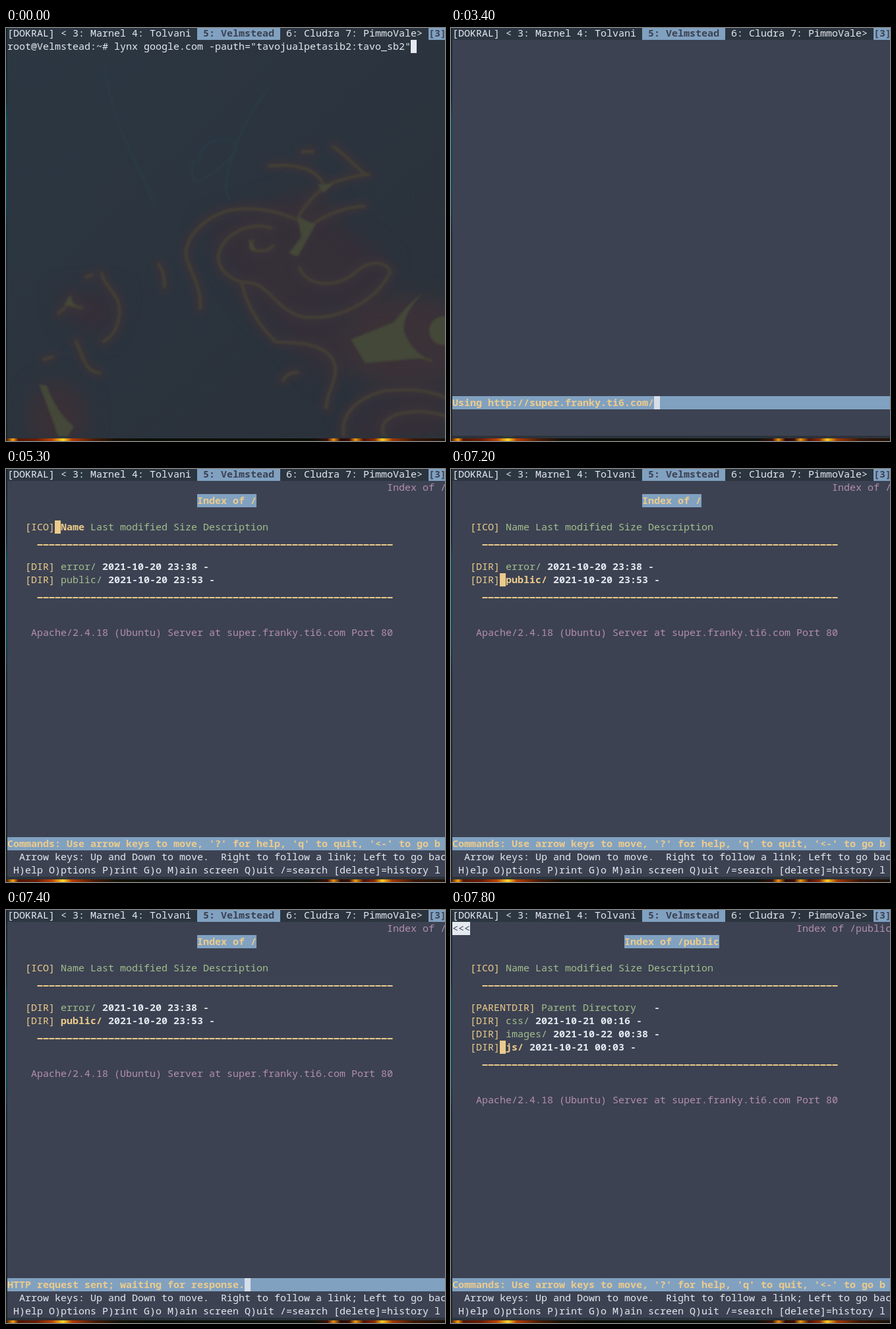
Write an HTML page that moves like this. It is 666x626 px and loops after 8 s.

```html
<!DOCTYPE html>
<html lang="en">
<head>
<meta charset="utf-8">
<title>Terminal session</title>
<style>
  html, body { margin: 0; width: 100%; height: 100%; overflow: hidden; background: #2b343e; }
  svg { display: block; width: 100%; height: 100%; }
  text { font: 15px "Noto Sans Mono", "DejaVu Sans Mono", monospace; font-variant-ligatures: none; white-space: pre; }
  .b { font-weight: 700; }
  filter { color-interpolation-filters: sRGB; }
  #veins { fill: none; stroke-linecap: round; }
</style>
</head>
<body>
<svg viewBox="0 0 666 626">
  <defs>
    <filter id="soft" x="-10%" y="-10%" width="120%" height="120%"><feGaussianBlur stdDeviation="1.6"/></filter>
    <filter id="glow" x="-10%" y="-10%" width="120%" height="120%"><feGaussianBlur stdDeviation="5"/></filter>
    <filter id="wide" x="-20%" y="-20%" width="140%" height="140%"><feGaussianBlur stdDeviation="16"/></filter>
    <linearGradient id="base" x2="1" y2="1">
      <stop stop-color="#2c3742"/><stop offset=".5" stop-color="#2b343e"/><stop offset="1" stop-color="#2a3039"/>
    </linearGradient>
    <linearGradient id="edge" x2="0" y2="1">
      <stop stop-color="#15262d"/><stop offset=".17" stop-color="#12303a"/><stop offset=".22" stop-color="#0d4859"/>
      <stop offset=".42" stop-color="#0f4353"/><stop offset=".5" stop-color="#142d35"/><stop offset="1" stop-color="#1d2522"/>
    </linearGradient>
    <linearGradient id="fire">
      <stop stop-color="#3a1200"/><stop offset=".016" stop-color="#ffa010"/><stop offset=".028" stop-color="#541600"/>
      <stop offset=".07" stop-color="#6a1c00"/><stop offset=".105" stop-color="#c04400"/><stop offset=".13" stop-color="#ffdc28"/>
      <stop offset=".15" stop-color="#b83c00"/><stop offset=".2" stop-color="#4a1a02"/>
      <stop offset=".25" stop-color="#161004"/><stop offset=".32" stop-color="#0a0e06"/><stop offset=".7" stop-color="#0d1008"/>
      <stop offset=".732" stop-color="#3a1000"/><stop offset=".746" stop-color="#f09010"/><stop offset=".762" stop-color="#2a0a00"/>
      <stop offset=".782" stop-color="#3a0e00"/><stop offset=".796" stop-color="#f09a10"/><stop offset=".815" stop-color="#4a1200"/>
      <stop offset=".84" stop-color="#902c00"/><stop offset=".857" stop-color="#ffd020"/>
      <stop offset=".88" stop-color="#a03800"/><stop offset=".93" stop-color="#3a1604"/><stop offset="1" stop-color="#1c1006"/>
    </linearGradient>
    <g id="veins">
      <path d="M400 209C440 206 472 212 483 240Q515 225 550 222M497 180C515 192 530 210 543 220M483 240Q458 262 444 285"/>
      <path d="M543 270C515 272 488 280 462 300L437 343"/>
      <path d="M455 298C420 278 380 270 340 276C296 288 268 322 274 350C281 372 296 392 295 425"/>
      <path d="M402 303C370 294 330 310 322 345C322 370 345 386 370 386C402 391 410 428 450 438C505 444 560 415 583 370C575 350 548 354 530 370C510 390 462 398 445 364"/>
      <path d="M358 388C365 420 386 455 410 476C450 476 495 480 500 516C500 540 485 556 486 576"/>
      <path d="M374 322Q370 338 385 338T405 330M420 534Q430 520 443 522M450 188L465 187"/>
      <path d="M145 372C150 395 175 402 172 435Q168 465 148 475M106 475C118 498 118 520 142 523M80 432Q95 422 98 408M98 420L115 424M232 358Q242 374 240 392M122 377L130 375M58 502L70 499"/>
      <path d="M513 620C505 590 530 560 575 550Q630 544 666 560M575 620Q562 598 592 586Q630 576 666 588"/>
      <path d="M600 462Q608 495 645 504"/>
    </g>
  </defs>

  <rect width="666" height="626" fill="url(#base)"/>
  <g fill="#352f38" filter="url(#wide)">
    <ellipse cx="605" cy="475" rx="105" ry="70" fill="#3b3238"/>
    <ellipse cx="78" cy="590" rx="45" ry="55" fill="#3a3037"/>
    <ellipse cx="455" cy="305" rx="50" ry="60" fill="#383138"/>
    <path d="M300 300L440 250L580 350L560 420L380 430ZM360 400L520 450L490 540ZM80 400L175 400L150 470L90 440Z"/>
    <path d="M510 626Q520 560 666 545V626Z"/>
  </g>
  <path d="M150 60Q160 130 190 190T225 270M400 90Q365 130 345 190T340 260M290 205Q300 165 335 170T320 215T285 200"
    fill="none" stroke="#2b3c46" stroke-width="4" opacity=".7" filter="url(#soft)"/>
  <use href="#veins" stroke="#3a333a" stroke-width="20" filter="url(#glow)" opacity=".7"/>
  <use href="#veins" stroke="#454034" stroke-width="5" filter="url(#soft)" opacity=".85"/>
  <g fill="#444838" filter="url(#soft)">
    <path d="M523 472L588 446Q610 418 633 401Q600 435 604 460Q612 484 636 500L545 508Z"/>
    <path d="M442 284Q456 294 470 297L443 346L429 341L448 317ZM472 236Q483 240 497 235L482 250Z"/>
    <path d="M50 540Q64 575 80 622H92L103 604Q76 582 62 542ZM368 318L380 338L370 336ZM88 420L96 407L106 422Z"/>
    <circle cx="664" cy="459" r="22"/>
  </g>
  <rect y="618" width="666" height="4" fill="#2b343d" opacity=".6"/>
  <rect width="2" height="626" fill="url(#edge)"/>
  <rect y="622" width="666" height="4" fill="url(#fire)"/>

  <g id="bar"></g>
  <g id="screen"></g>
</svg>
<script>
const CW = 9, RH = 20, COLS = 74, LOOP = 8000;
const C = {
  panel: '#3c4252', dark: '#3b4252', blue: '#81a1c1', red: '#bf616a', yellow: '#ebcb8b',
  green: '#a3be8c', purple: '#b48ead', white: '#e5e9f0', cursor: '#d8dee9'
};
const x = col => 2 + col * CW;
const y = row => row * RH - 2;
const esc = s => s.replace(/&/g, '&amp;').replace(/</g, '&lt;');

const rect = (col, row, n, fill) =>
  `<rect x="${x(col)}" y="${y(row)}" width="${n * CW}" height="${RH}" fill="${fill}"/>`;
const text = (col, row, s, fill = C.white, bold = false) =>
  `<text x="${x(col)}" y="${y(row) + 15}" fill="${fill}"${bold ? ' class="b"' : ''}>${esc(s)}</text>`;
const label = (col, row, s, fill, bg, bold = true) =>
  rect(col, row, s.length, bg) + text(col, row, s, fill, bold);
const rule = row =>
  `<path d="M${x(5) + .5} ${y(row) + 17}h540" stroke="${C.yellow}" stroke-width="2" stroke-dasharray="8 1"/>`;
const panel = `<rect x="2" y="18" width="664" height="600" fill="${C.panel}"/>`;

const message = (s, bg, cursor = true) =>
  rect(0, 28, COLS, bg) + text(0, 28, s, C.yellow, true) +
  (cursor ? rect(s.length, 28, 1, C.cursor) : '');

const COMMANDS = "Commands: Use arrow keys to move, '?' for help, 'q' to quit, '<-' to go b";

// Each entry: tag, link, details, column of the details
function listing(path, entries, picked, status) {
  const title = 'Index of ' + path;
  const end = 7 + entries.length;
  const link = (col, row, s) => {
    const on = s === picked;
    return (on && !status ? rect(col - 1, row, 1, C.yellow) : '') +
      text(col, row, s, on ? C.yellow : C.green, on);
  };
  let out = panel + text(COLS - title.length, 1, title, C.purple) +
    label(Math.floor((COLS - title.length) / 2), 2, title, C.yellow, C.blue) +
    text(3, 4, '[ICO]', C.yellow) + link(9, 4, 'Name') +
    text(14, 4, 'Last modified Size Description', C.green) + rule(5);
  if (path !== '/') out += label(0, 1, '<<<', C.dark, C.white, false);
  entries.forEach(([tag, name, info, at], i) => {
    const row = 7 + i;
    out += text(3, row, tag, C.yellow) + link(4 + tag.length, row, name) +
      text(at, row, info, C.white, true);
  });
  return out + rule(end) +
    text(4, end + 3, 'Apache/2.4.18 (Ubuntu) Server at super.franky.ti6.com Port 80', C.purple) +
    (status ? message(status, C.blue) : message(COMMANDS, C.blue, false)) +
    text(2, 29, 'Arrow keys: Up and Down to move.  Right to follow a link; Left to go bac') +
    text(1, 30, 'H)elp O)ptions P)rint G)o M)ain screen Q)uit /=search [delete]=history l');
}

const root = (picked, status) => listing('/', [
  ['[DIR]', 'error/', '2021-10-20 23:38 -', 16],
  ['[DIR]', 'public/', '2021-10-20 23:53 -', 17]
], picked, status);

const pub = picked => listing('/public', [
  ['[PARENTDIR]', 'Parent Directory', '-', 34],
  ['[DIR]', 'css/', '2021-10-21 00:16 -', 14],
  ['[DIR]', 'images/', '2021-10-22 00:38 -', 17],
  ['[DIR]', 'js/', '2021-10-21 00:03 -', 13]
], picked);

const prompt = 'root@Velmstead:~# lynx google.com -pauth="tavojualpetasib2:tavo_sb2"';

const scenes = [
  [0, text(0, 1, prompt) + rect(prompt.length, 1, 1, C.white)],
  [300, panel + message('Alert!: Proxy authorization required -- retrying', C.red)],
  [3400, panel + message('Using http://super.franky.ti6.com/', C.blue)],
  [5300, root('Name')],
  [6600, root('public/')],
  [6800, root('error/')],
  [7200, root('public/')],
  [7400, root('public/', 'HTTP request sent; waiting for response.')],
  [7500, pub('Name')],
  [7800, pub('js/')]
];

document.getElementById('bar').innerHTML =
  text(0, 0, '[DOKRAL] < 3: Marnel 4: Tolvani') +
  label(32, 0, ' 5: Velmstead ', C.dark, C.blue) +
  text(47, 0, '6: Cludra 7: PimmoVale>') +
  label(71, 0, '[3]', C.dark, C.blue);

const screenEl = document.getElementById('screen');
let shown = -1;

function draw(t) {
  const i = scenes.findLastIndex(([start]) => start <= t);
  if (i === shown) return;
  shown = i;
  screenEl.innerHTML = scenes[i][1];
}

const began = performance.now();
function tick() {
  draw((performance.now() - began) % LOOP);
  requestAnimationFrame(tick);
}
tick();
</script>
</body>
</html>
```
